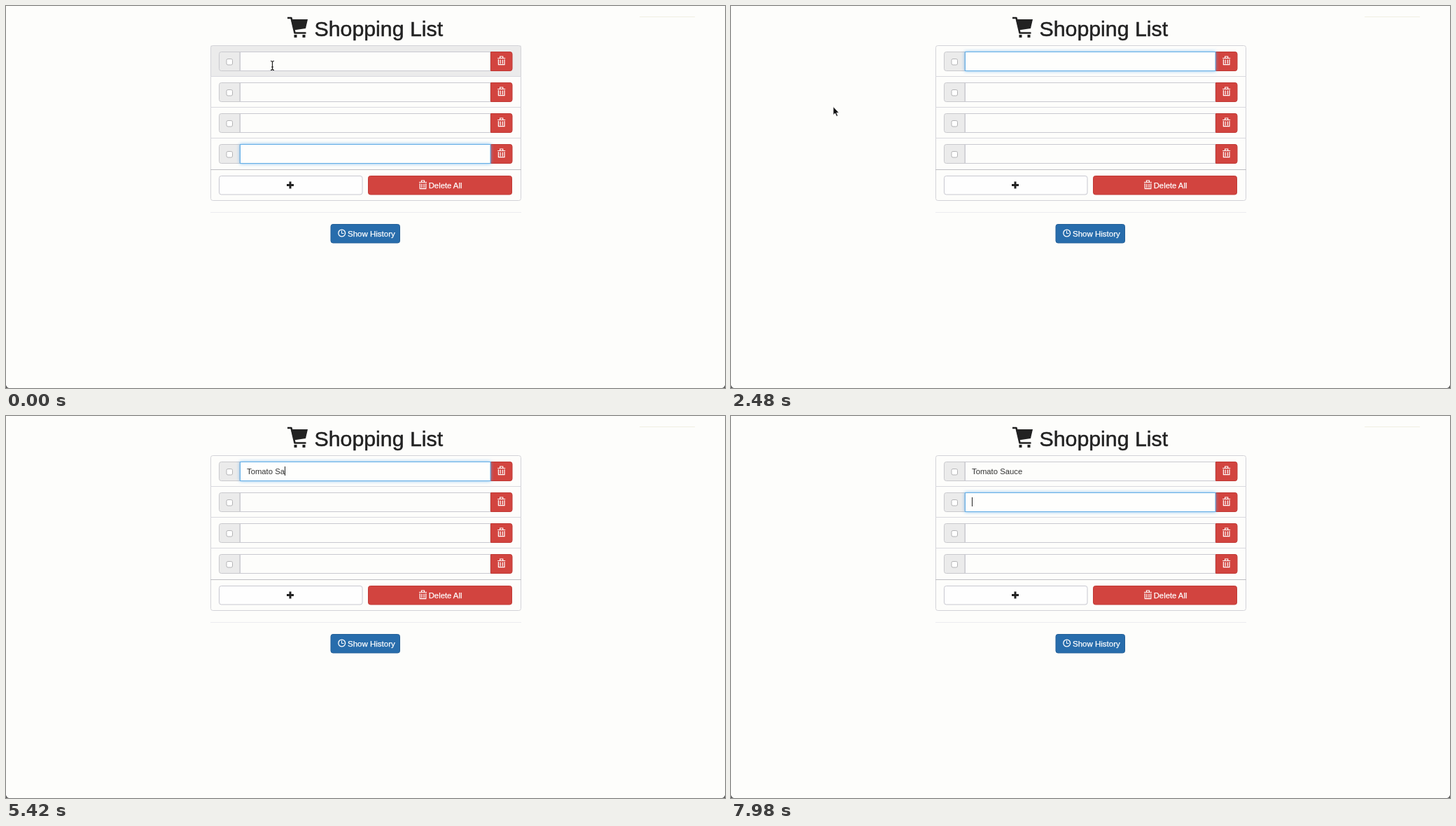
An HTML page that plays this animation: 1027x545 px, repeating every 8 s.

```html
<!DOCTYPE html>
<html lang="en">
<head>
<meta charset="utf-8">
<title>Shopping List</title>
<style>
html, body { margin: 0; width: 100%; height: 100%; overflow: hidden; background: #fdfdfb; }
svg { display: block; }
text { font: 11.3px "Liberation Sans", Arial, sans-serif; fill: #333; white-space: pre; }
.light text { fill: #fff; stroke: #fff; stroke-width: .25; }
.focus { fill: #fefefd; stroke: #62ade6; filter: drop-shadow(0 0 2.5px rgba(90, 170, 235, .75)); }
</style>
</head>
<body>
<svg width="1027" height="545" viewBox="0 0 1027 545">
  <defs>
    <g id="trash" fill="none" stroke="#fff">
      <path d="M-5.5 -3.5H5.5M-2 -4V-6H2V-4" stroke-width="1.2"/>
      <path d="M-4.3 -2V5.6H4.3V-2M-1.6 -1.5V4.5M1.6 -1.5V4.5" stroke-width="1.2"/>
    </g>
    <g id="row">
      <path d="M334 65.5H307.5a3 3 0 0 0-3 3V89.500a3 3 0 0 0 3 3H334Z" fill="#ebebeb" stroke="#c9c9cd"/>
      <rect x="315" y="75.500" width="8.500" height="8.500" rx="2" fill="#fff" stroke="#b4b4b6"/>
      <rect x="334.5" y="65.500" width="357.500" height="27" fill="#fdfdfb" stroke="#c9c9d0"/>
      <path d="M692.5 65.500H720a3 3 0 0 1 3 3V89.500a3 3 0 0 1-3 3H692.500Z" fill="#d2443f" stroke="#c03a36"/>
      <use href="#trash" x="707.700" y="78"/>
    </g>
  </defs>

  <rect width="1027" height="545" fill="#fdfdfb"/>
  <path d="M905 15.500H984" stroke="#f1efe2"/>
  <path d="M0 541V545H4Q1 544 0 541ZM1027 541V545H1023Q1026 544 1027 541Z" fill="#555"/>

  <g fill="none" stroke="#222">
    <path d="M402 17H407.500L412.500 38.500H428.500" stroke-width="2.600" stroke-linejoin="round"/>
    <path d="M407 19H431L428 32L411 34.500Z" fill="#222" stroke="none"/>
    <path d="M413.500 41V45M425.500 41V45" stroke-width="4"/>
  </g>
  <text x="440.500" y="43" style="font-size:30.300px;fill:#222;stroke:#222;stroke-width:.5">Shopping List</text>

  <rect id="hover" x="292" width="444" height="44" fill="#ebebeb"/>
  <rect x="292.500" y="56.500" width="443" height="221" rx="3" fill="none" stroke="#d3d3d8"/>
  <path d="M292 100.500H736M292 144.500H736M292 188.500H736" stroke="#d9d9df"/>
  <path d="M292 233.500H736" stroke="#bebec2"/>
  <path d="M292 294.500H736" stroke="#ececf0"/>
  <use href="#row"/><use href="#row" y="44"/><use href="#row" y="88"/><use href="#row" y="132"/>

  <rect x="304.500" y="242.500" width="204.500" height="26.500" rx="3" fill="#fefefe" stroke="#c8c8d0"/>
  <path d="M401 255.500H411M406 250.500V260.500" stroke="#222" stroke-width="3"/>
  <g class="light">
    <rect x="517.500" y="242.500" width="205" height="26.500" rx="3" fill="#d2443f" stroke="#c03a36"/>
    <use href="#trash" x="595.500" y="255"/>
    <text x="603.700" y="259.500">Delete All</text>
    <rect x="464" y="311.500" width="98.500" height="26.500" rx="3" fill="#286dac" stroke="#225f98"/>
    <path d="M479.500 320.500V324.500H482.500" fill="none" stroke="#fff"/>
    <circle cx="479.700" cy="324" r="4.900" fill="none" stroke="#fff" stroke-width="1.300"/>
    <text x="488" y="328.500" style="font-size:11.500px">Show History</text>
  </g>

  <g id="rings"></g>
  <text id="item" x="344" y="82.500"></text>
  <path id="caret" d="M.5 72V85" stroke="#222"/>
  <path id="beam" d="M-2.500 -6.500Q0 -6.500 0 -4.500Q0 -6.500 2.500 -6.500M0 -5V5M-2.500 6.500Q0 6.500 0 4.500Q0 6.500 2.500 6.500M-1.500 2H1.500" fill="none" stroke="#222" stroke-width="1.200"/>
  <path id="arrow" d="M0 0V12L2.700 9.600L4.700 14L6.700 13.100L4.800 8.900H8.400Z" fill="#111" stroke="#fff" stroke-width=".8"/>
</svg>
<script>
const $ = id => document.getElementById(id);
const LOOP = 8000, TOP = 56, ROW = 44, BLINK = 500;
const WORDS = "Tomato Sauce";
const KEYS = [2600, 2900, 3220, 3700, 4080, 4400, 4700, 5000, 5300, 5600, 5900, 6200];
// Which row holds the keyboard focus, and from when
const FOCUS = [{ at: -700, row: 3 }, { at: 760, row: 0 }, { at: 7500, row: 1 }];
// Pointer stops: time, x, y
const POINTER = [[0, 380.5, 85], [800, 379.5, 83.5], [1060, 379.5, 83.5], [1620, 146, 143.5], [LOOP, 146, 143.5]];

const clamp = v => Math.max(0, Math.min(1, v));
const show = (el, on) => el.setAttribute("visibility", on ? "visible" : "hidden");
const move = (el, x, y) => el.setAttribute("transform", `translate(${x} ${y})`);

$("rings").innerHTML = FOCUS.map(f =>
  `<rect class="focus" x="334.5" y="${65.5 + f.row * ROW}" width="357.5" height="27"/>`).join("");
const rings = [...$("rings").children];

function pointerAt(t) {
  const i = POINTER.findIndex((p, k) => k && t <= p[0]);
  const [t0, x0, y0] = POINTER[i - 1], [t1, x1, y1] = POINTER[i];
  const k = clamp((t - t0) / (t1 - t0)), e = k * k * (3 - 2 * k);
  return [x0 + (x1 - x0) * e, y0 + (y1 - y0) * e];
}

function draw(t) {
  const typed = KEYS.filter(k => k <= t);
  const active = FOCUS.filter(f => f.at <= t).pop();

  $("item").textContent = WORDS.slice(0, typed.length);
  rings.forEach((ring, i) => {
    const next = FOCUS[i + 1];
    const fade = clamp((t - FOCUS[i].at) / 150) - (next ? clamp((t - next.at) / 150) : 0);
    ring.setAttribute("opacity", fade);
    show(ring, fade > 0);
  });

  const typing = active.row === 0 && typed.length > 0;
  const since = t - Math.max(active.at, typing ? typed[typed.length - 1] : active.at);
  show($("caret"), Math.floor(since / BLINK) % 2 === 0);
  move($("caret"), typing ? Math.round(344 + $("item").getComputedTextLength()) : 344, active.row * ROW);

  const [x, y] = pointerAt(t);
  const visible = t < KEYS[0];
  const row = Math.floor((y - TOP) / ROW);
  const inList = visible && x > 292 && x < 736 && row >= 0 && row < 4;
  const inField = inList && x > 334 && x < 692 && y - TOP - row * ROW > 9 && y - TOP - row * ROW < 37;
  show($("hover"), inList);
  $("hover").setAttribute("y", TOP + row * ROW + .5);
  show($("beam"), visible && inField);
  show($("arrow"), visible && !inField);
  move($("beam"), x, y);
  move($("arrow"), x, y);
}

const start = performance.now();
function tick() {
  draw((performance.now() - start) % LOOP);
  requestAnimationFrame(tick);
}
tick();
</script>
</body>
</html>
```
